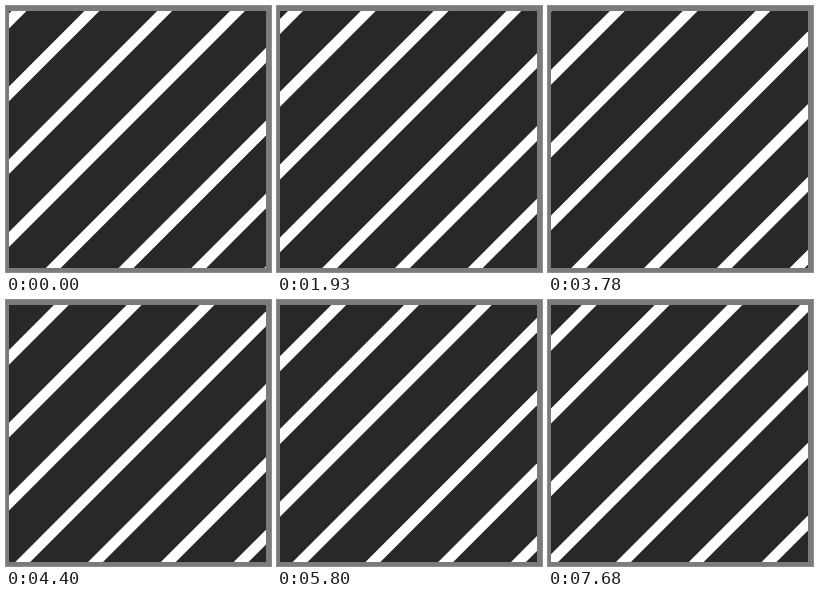
An HTML page with a canvas that plays this animation: 265 by 266 pixels, repeating every 7810 ms.

```html
<!DOCTYPE html>
<html lang="en">
<head>
<meta charset="utf-8">
<title>Moving stripes</title>
<style>
html, body { margin: 0; width: 100%; height: 100%; overflow: hidden; background: #7b7b7b; }
canvas { display: block; width: 265px; height: 266px; }
</style>
</head>
<body>
<canvas id="stage" width="265" height="266"></canvas>
<script>
const LOOP = 7810;
const REST = 890;      // stripes stand still until here
const LAST = 7680;     // time of the last step
const RUN = 830;       // a run is twelve steps and a slightly longer hold
const STEP = 68;
const LEAD = 12;       // steps land a little before their nominal time
const SPEED = 0.1054;  // px per ms
const ZERO = 1182;     // time at which the moving stripes cross the rest pose

const PERIOD = 72.8;   // horizontal distance between stripes
const WIDTH = 14.9;    // horizontal width of a stripe
const BASE = 10.6;     // x + y of the first stripe's left edge at rest
const BOX = { x: 3, y: 5, w: 257, h: 257 };

function shiftAt(t) {
  if (t < REST) return 0;
  const elapsed = Math.min(t, LAST) - REST + LEAD;
  const run = Math.floor(elapsed / RUN);
  const step = Math.min(11, Math.floor((elapsed - run * RUN) / STEP));
  return SPEED * (REST + run * RUN + step * STEP - ZERO);
}

const ctx = document.getElementById('stage').getContext('2d');

function draw(shift) {
  const { x, y, w, h } = BOX, bottom = y + h;
  ctx.fillStyle = '#7b7b7b';
  ctx.fillRect(0, 0, 265, 266);
  ctx.save();
  ctx.beginPath();
  ctx.rect(x, y, w, h);
  ctx.clip();
  ctx.fillStyle = '#282828';
  ctx.fillRect(x, y, w, h);
  ctx.fillStyle = '#fff';
  const first = ((BASE + shift) % PERIOD + PERIOD) % PERIOD - PERIOD;
  for (let c = first; c < x + w + bottom; c += PERIOD) {
    ctx.beginPath();
    ctx.moveTo(c - y, y);
    ctx.lineTo(c - y + WIDTH, y);
    ctx.lineTo(c - bottom + WIDTH, bottom);
    ctx.lineTo(c - bottom, bottom);
    ctx.fill();
  }
  ctx.restore();
}

const start = performance.now();
function tick() {
  draw(shiftAt((performance.now() - start) % LOOP));
  requestAnimationFrame(tick);
}
tick();
</script>
</body>
</html>
```
